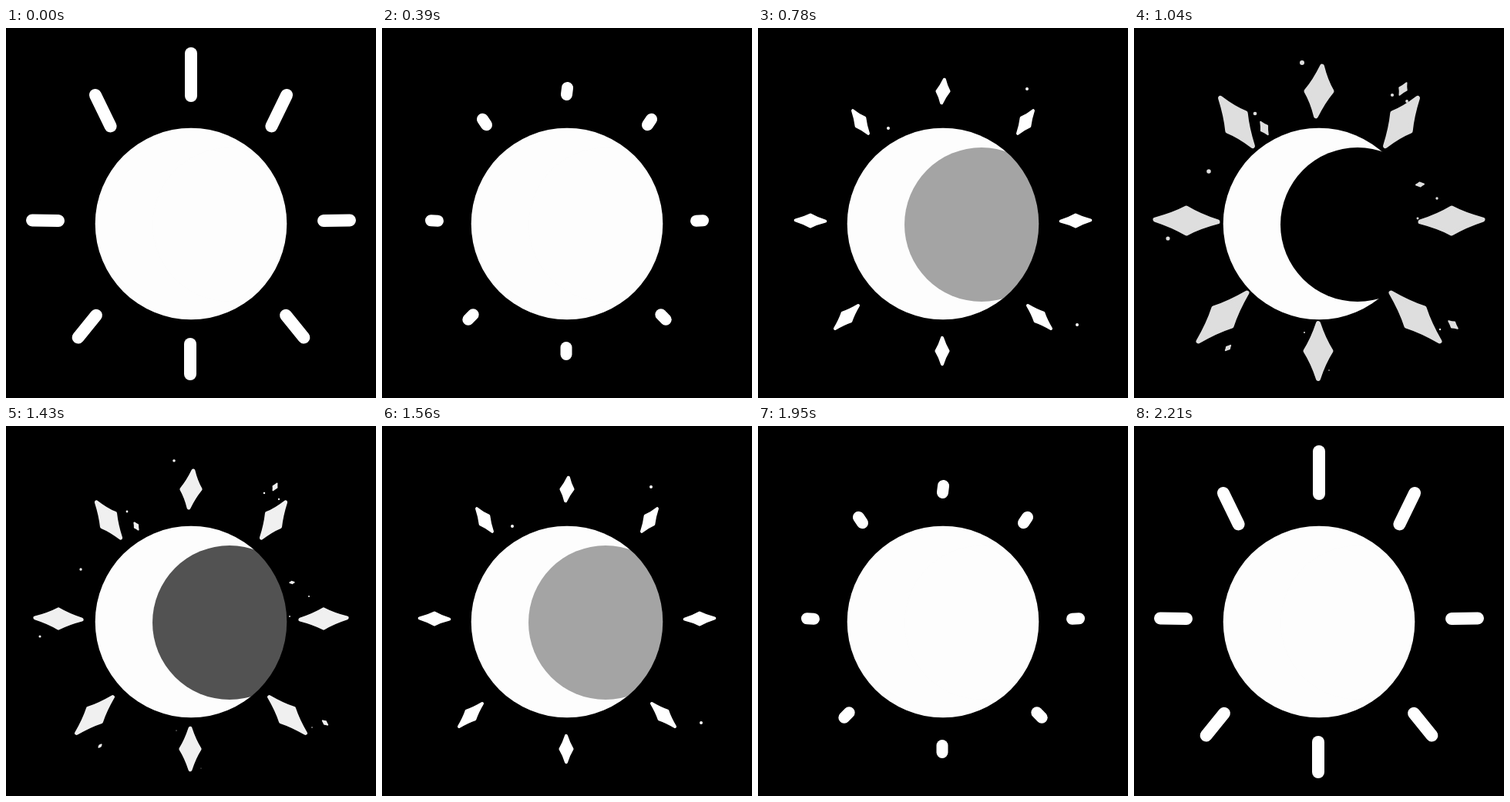
An HTML page with a canvas for the animation above (2340 ms loop, 480 by 480 pixels).

```html
<!DOCTYPE html>
<html lang="en">
<head>
<meta charset="utf-8">
<title>Sun and moon</title>
<style>
  html, body { margin: 0; width: 100%; height: 100%; overflow: hidden; background: #000; }
  canvas { display: block; width: 100vmin; height: 100vmin; }
</style>
</head>
<body>
<canvas id="stage" width="480" height="480"></canvas>
<script>
const ctx = document.getElementById('stage').getContext('2d');
const STEP = 130, STEPS = 18, MID = 240;

// Arms from top to bottom, mirrored left and right of the middle.
// x, y: centre; near, far: reach of the sun ray; slant: its angle;
// turn, size: angle and length of the night star. Angles in degrees.
const ARMS = [
  { x: 0, y: 82, near: 6, far: 49, slant: -90, turn: -83, size: 71 },
  { x: 107, y: 122, near: 6, far: 39, slant: -64, turn: -56, size: 81 },
  { x: 172, y: 250, near: 0, far: 34, slant: -1, turn: -2, size: 87 },
  { x: 125, y: 375, near: 3, far: 34, slant: 51, turn: 45, size: 95 },
  { x: -1, y: 419, near: 9, far: 30, slant: 90, turn: 90, size: 78 }
];
const GLINTS = [
  { x: 349, y: 79, turn: -60, size: 20 },
  { x: 169, y: 130, turn: 60, size: 21 },
  { x: 414, y: 385, turn: 40, size: 17 },
  { x: 371, y: 203, turn: -5, size: 12 },
  { x: 122, y: 415, turn: -45, size: 11 }
];
// Dots get smaller along the list.
const DOTS = [
  [218, 45], [97, 186], [44, 273], [157, 111], [335, 87], [354, 95],
  [393, 221], [368, 247], [397, 391], [221, 395], [253, 444]
];

const gray = v => `rgb(${v},${v},${v})`;
const mix = (a, b, t) => [a[0] + (b[0] - a[0]) * t, a[1] + (b[1] - a[1]) * t];

function polar(r, deg) {
  const a = deg * Math.PI / 180;
  return [r * Math.cos(a), r * Math.sin(a)];
}

function disc(x, y, r) {
  ctx.beginPath();
  ctx.arc(x, y, r, 0, Math.PI * 2);
  ctx.fill();
}

function line(a, b, w) {
  ctx.lineWidth = w;
  ctx.beginPath();
  ctx.moveTo(...a);
  ctx.lineTo(...b);
  ctx.stroke();
}

// Four-pointed star around the origin: hollow sides, corners rounded by w.
function star(size, width, turn, cross, w) {
  const a = polar((size - w) / 2, turn), b = polar((width - w) / 2, cross);
  const pts = [a, b, a.map(v => -v), b.map(v => -v)];
  ctx.lineWidth = w;
  ctx.beginPath();
  ctx.moveTo(...a);
  pts.forEach((p, i) => {
    const q = pts[(i + 1) % 4];
    ctx.quadraticCurveTo(...mix(mix(p, q, 0.5), [0, 0], 0.16), ...q);
  });
  ctx.closePath();
  ctx.fill();
  ctx.stroke();
}

function eachArm(drawArm) {
  ARMS.forEach((arm, i) => {
    for (const side of arm.x > 0 ? [1, -1] : [1]) {
      ctx.save();
      ctx.translate(MID + side * arm.x, arm.y);
      ctx.scale(side, 1);
      drawArm(arm, i * 45);
      ctx.restore();
    }
  });
}

// Sun rays shrinking into stubs as t goes from 0 to 1.
function rays(t, stub = 9) {
  eachArm(({ near, far, slant, turn }) => line(
    mix(polar(far, slant), polar(stub / 2, turn), t),
    mix(polar(-near, slant), polar(-stub / 2, turn), t),
    16 - t
  ));
}

function stars(k, w) {
  eachArm(({ size, turn }, cross) => star(size * k, 39 * k, turn, cross, w));
}

function sparks(k) {
  for (const { x, y, turn, size } of GLINTS) {
    ctx.save();
    ctx.translate(x, y);
    star(size * k, size * k * 0.6, turn, turn + 80, 2);
    ctx.restore();
  }
  DOTS.forEach(([x, y], i) => disc(x, y, (3 - 0.22 * i) * k));
}

const specks = () => GLINTS.slice(0, 3).forEach(g => disc(g.x, g.y, 2));

// From day to night: shadow gray, ray gray, ray drawing.
const POSES = [
  [253, 255, () => rays(0)],
  [253, 255, () => rays(0.5)],
  [253, 255, () => rays(1)],
  [253, 255, () => rays(1, 4)],
  [253, 255, () => stars(0.35, 6)],
  [164, 255, () => { stars(0.49, 4); specks(); }],
  [82, 240, () => { stars(0.75, 5); sparks(0.6); }],
  [0, 222, () => { stars(1, 6); sparks(1); }]
];

// Hold the day, step into the night, hold it, step back.
function poseAt(ms) {
  const n = Math.floor(ms / STEP) % STEPS;
  return POSES[Math.max(0, Math.min(n - 1, STEPS - 1 - n, POSES.length - 1))];
}

function draw(ms) {
  const [shadow, ray, drawRays] = poseAt(ms);
  ctx.clearRect(0, 0, 480, 480);
  ctx.fillStyle = gray(253);
  disc(MID, 254, 124.3);
  ctx.globalCompositeOperation = 'source-atop';
  ctx.fillStyle = gray(shadow);
  disc(290, 255, 100);
  ctx.globalCompositeOperation = 'source-over';
  ctx.fillStyle = ctx.strokeStyle = gray(ray);
  ctx.lineCap = ctx.lineJoin = 'round';
  drawRays();
}

const start = performance.now();
function tick() {
  draw(performance.now() - start);
  requestAnimationFrame(tick);
}
tick();
</script>
</body>
</html>
```
